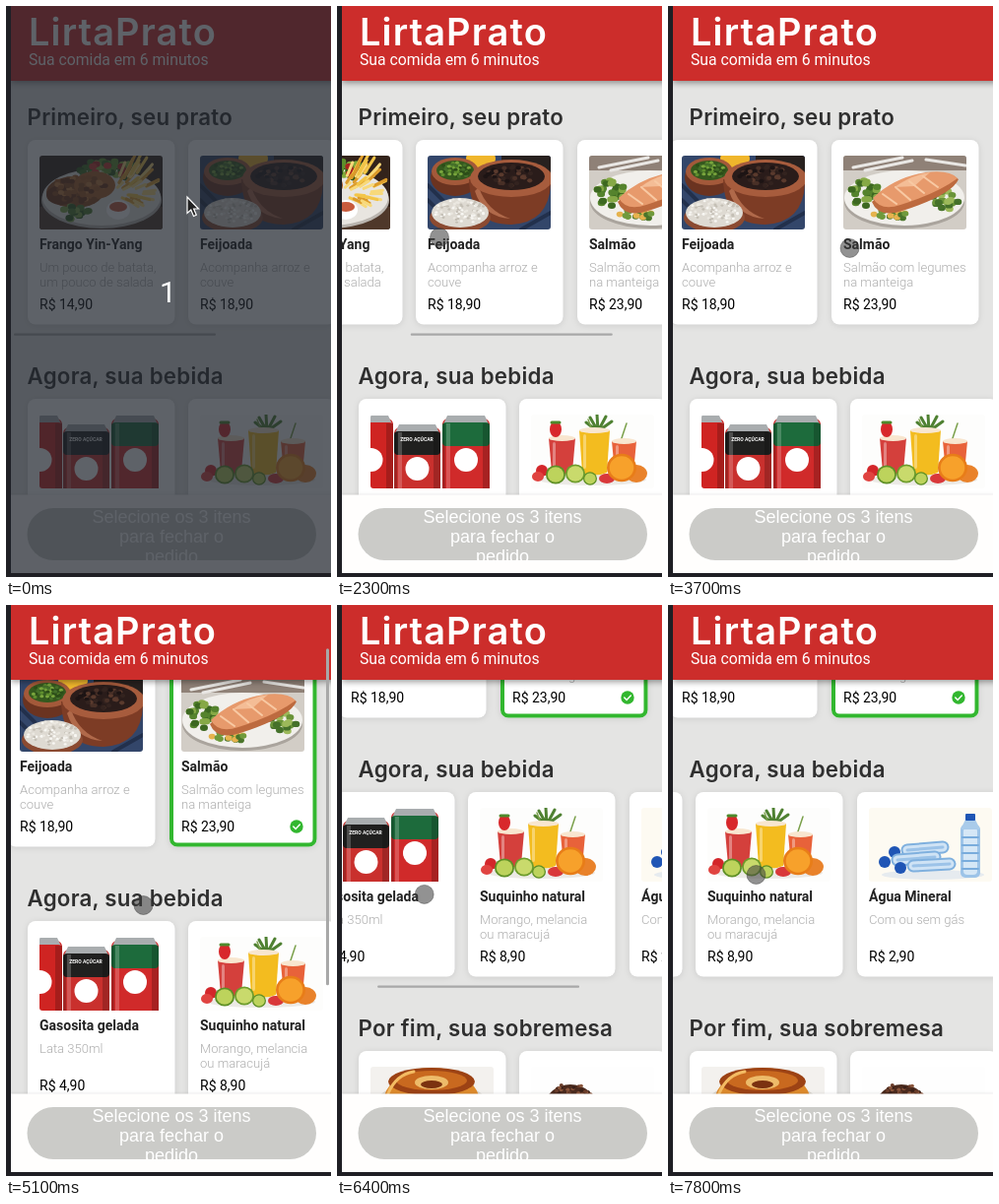
Recreate the animation shown at these times as an HTML page. Size 330 px wide and 580 px high, loop 8 s.

```html
<!DOCTYPE html>
<html lang="pt-BR">
<head>
<meta charset="utf-8">
<style>
html, body { margin: 0; width: 100%; height: 100%; overflow: hidden; background: #1f1f24; }
svg { display: block; }
text { font-family: Roboto, sans-serif; }
.brand { font: 600 38px Inter, sans-serif; letter-spacing: 1.1px; fill: #fff; }
.title { font: 600 22.3px Inter, sans-serif; letter-spacing: .25px; fill: #2f2f2f; }
.name { font-weight: 700; font-size: 14px; fill: #222; }
.desc { font-weight: 300; font-size: 13.05px; fill: #adadad; }
.price { font-size: 14px; }
.button { font: 18px "Liberation Sans", Arial, sans-serif; fill: #fff; text-anchor: middle; }
.card { fill: #fff; filter: drop-shadow(0 1px 3px rgba(0,0,0,.1)); }
.header { fill: #cc2d2b; filter: drop-shadow(0 2px 3px rgba(0,0,0,.4)); }
.footer { fill: #fffefd; filter: drop-shadow(0 -1px 1px rgba(0,0,0,.08)); }
</style>
</head>
<body>
<svg id="stage" width="330" height="580" viewBox="0 0 330 580"></svg>
<script>
const rect = (x, y, w, h, fill, rx = 0) =>
  `<rect x="${x}" y="${y}" width="${w}" height="${h}" rx="${rx}" fill="${fill}"/>`;
const oval = (x, y, rx, ry, fill) => `<ellipse cx="${x}" cy="${y}" rx="${rx}" ry="${ry}" fill="${fill}"/>`;
const path = (d, fill) => `<path d="${d}" fill="${fill}"/>`;
const line = (d, color, w) =>
  `<path d="${d}" fill="none" stroke="${color}" stroke-width="${w}" stroke-linecap="round"/>`;
const text = (x, y, cls, s, more = '') => `<text x="${x}" y="${y}" class="${cls}" ${more}>${s}</text>`;

let seed = 7;
const rnd = () => (seed = seed * 16807 % 2147483647) / 2147483647;
const spread = (n, draw) => Array.from({ length: n }, (_, i) => {
  const a = rnd() * 6.283, d = Math.sqrt(rnd());
  return draw(Math.cos(a) * d, Math.sin(a) * d, i);
}).join('');
// A heap of small pieces filling an ellipse
const heap = (n, x, y, rx, ry, size, colors) => spread(n, (u, v, i) =>
  oval((x + u * rx).toFixed(1), (y + v * ry).toFixed(1), size, size * .8, colors[i % colors.length]));

function chicken() {
  return rect(0, 0, 125, 75, '#33231b') + rect(0, 52, 125, 23, '#4f382a') +
    oval(63, 45, 61, 29, '#b9b4ae') + oval(63, 42, 60, 29, '#e8e5e0') +
    heap(55, 68, 15, 32, 10, 4, ['#5d8f2c', '#83ac3c', '#3f6d22', '#2f5519']) +
    heap(9, 74, 13, 26, 6, 4, ['#c8352a', '#a9241f']) +
    spread(42, (u, v, i) => {
      const x = 92 + u * 17, y = 32 + v * 17;
      return line(`M${x} ${y}l${8 + u * 4} ${v * 12 - 5}`, ['#f3c548', '#dc9b2a', '#f8d97a'][i % 3], 3);
    }) +
    oval(36, 37, 29, 16, '#8a4719') + oval(56, 30, 21, 14, '#a95c25') + oval(22, 40, 15, 10, '#6d3213') +
    heap(50, 40, 34, 28, 13, 3, ['#c47a38', '#6d3213', '#a0561f', '#8a4719']) +
    heap(16, 37, 58, 16, 7, 4, ['#4a7a2a', '#79a443', '#2f5a1d']) +
    oval(80, 55, 12, 10, '#fff') + oval(80, 52, 9, 5, '#c75a3c');
}

function beans() {
  return rect(0, 0, 125, 75, '#33466a') + rect(75, 0, 50, 30, '#28211f') +
    line('M0 45L30 75M0 30L45 75M95 75L125 58', '#22304c', 4) +
    oval(54, 3, 15, 10, '#f0b62c') +
    oval(28, 22, 25, 19, '#6b3320') + oval(28, 16, 24, 14, '#a3593a') + oval(28, 15, 19, 10, '#35591e') +
    heap(46, 28, 15, 16, 8, 2, ['#5f8f2e', '#2c4d18', '#79a53d', '#45702a']) +
    path('M42 24Q43 70 85 70Q127 68 125 20Z', '#7d3c25') + path('M48 36Q56 62 84 64Q60 56 52 32Z', '#b0694a') +
    oval(85, 23, 42, 19, '#a75c3d') + oval(85, 21, 34, 14, '#2a1c1a') +
    heap(44, 85, 21, 28, 10, 2.6, ['#493027', '#1d1414', '#5a3a2d', '#33231f']) +
    oval(33, 63, 31, 15, '#8b4a31') + oval(33, 58, 29, 15, '#dedad2') +
    heap(90, 33, 57, 26, 13, 1.5, ['#f8f7f3', '#c4bfb5', '#ebe8e1']);
}

function salmon() {
  return rect(0, 0, 125, 75, '#d2cdc6') + rect(0, 0, 125, 15, '#8f8177') +
    line('M10 12L60 2M22 15L70 5M84 4L124 10', '#e9e7e4', 3) +
    oval(62, 47, 61, 27, '#aaa49d') + oval(62, 43, 61, 28, '#f1efeb') +
    heap(30, 22, 38, 15, 13, 4, ['#55832d', '#86a946', '#3d6821']) +
    heap(22, 102, 45, 15, 10, 4, ['#6a9438', '#45712a', '#9cb95a']) +
    heap(20, 47, 60, 20, 5, 3.5, ['#6f9a3c', '#e6b34e', '#4a752a']) +
    path('M29 47Q46 30 78 22Q106 14 117 24Q110 40 60 56Q36 64 29 47Z', '#bd6a3f') +
    path('M30 43Q52 22 84 17Q108 14 116 23Q96 38 58 50Q38 57 30 43Z', '#e79a6c') +
    path('M52 32Q68 20 88 17L72 31Z', '#f4bd96') +
    line('M40 39l14 10M53 32l15 13M67 26l15 12M81 21l15 11', '#f8c9a3', 2);
}

function can(x, y, w, top, side) {
  const mid = x + w / 2;
  return rect(x, y + 3, w, 82, side, 6) + path(`M${x} ${y + 11}L${x + 5} ${y}H${x + w - 5}L${x + w} ${y + 11}Z`, '#a9adaf') +
    rect(x, y + 7, w, 24, top, 4) + rect(x + 4, y + 8, 4, 67, 'rgba(255,255,255,.2)') +
    rect(x, y + 8, 3, 67, 'rgba(0,0,0,.2)') + rect(x + w - 7, y + 8, 7, 67, 'rgba(0,0,0,.2)') +
    oval(mid, y + 45, 12, 12, '#fff');
}
function cans() {
  return rect(0, 0, 125, 75, '#fff') + can(-22, 1, 45, '#cf2422', '#cf2422') +
    can(73, 1, 48, '#1d6b3c', '#d02a2a') + can(24, 10, 47, '#20201f', '#c9302d') +
    text(47, 27, '', 'ZERO AÇÚCAR', 'font-size="5" font-weight="700" fill="#fff" text-anchor="middle"');
}

function glass(x, y, w, h, color) {
  return path(`M${x} ${y}H${x + w}L${x + w - 3} ${y + h}Q${x + w / 2} ${y + h + 5} ${x + 3} ${y + h}Z`, color) +
    oval(x + w / 2, y, w / 2, 3, '#f8e6cf') + rect(x + 4, y + 4, 3, h - 8, 'rgba(255,255,255,.35)', 2);
}
function slice(x, y, r, rim, flesh) {
  return oval(x, y, r, r * .95, rim) + oval(x, y, r * .82, r * .78, flesh);
}
function juice() {
  return rect(0, 0, 125, 75, '#fdfdfc') + oval(62, 66, 55, 6, '#eceae6') +
    line('M68 17L60 3M68 17L67 0M68 17L76 2M68 17L82 7M68 17L56 8', '#4f8132', 3) +
    line('M61 13l-3 -8M91 27l6 -18', '#7aa04a', 1.5) +
    glass(18, 24, 27, 34, '#d4403c') + glass(82, 27, 25, 32, '#e8623a') + glass(49, 16, 31, 43, '#f3bc1f') +
    oval(25, 15, 6, 8, '#d8282b') + line('M21 8h8', '#4e8a2c', 3) +
    oval(11, 57, 6, 6, '#d3262a') + oval(7, 63, 6, 5, '#e04340') +
    slice(25, 61, 10, '#5d8f25', '#bdd35c') + slice(45, 60, 10, '#6d9c2c', '#c9da6c') + slice(60, 65, 7, '#5d8f25', '#bdd35c') +
    oval(77, 65, 8, 5, '#d9383a') + oval(107, 60, 11, 9, '#e9822a') + slice(92, 54, 15, '#e87d18', '#f7a12b');
}

function lyingBottle(x, y, dx, dy) {
  const d = `M${x + 13} ${y - 2}l${dx} ${dy}`;
  return line(d, '#7fb0de', 13) + line(d, '#cfe3f5', 9) + line(d, '#9cc3e8', 3) + oval(x, y, 6, 6, '#1f55b5');
}
function water() {
  return rect(0, 0, 125, 75, '#fdfaf2') + oval(65, 68, 52, 5, '#e6ebef') +
    lyingBottle(26, 45, 36, -3) + lyingBottle(16, 55, 38, -3) + lyingBottle(32, 61, 37, -2) +
    rect(93, 17, 20, 54, '#9dc4e8', 5) + rect(96, 20, 14, 48, '#d5e7f6', 4) +
    path('M98 12h10l5 10H93Z', '#a9cbea') + rect(98, 6, 10, 7, '#1f55b5', 1) +
    line('M95 30h16M95 38h16M95 46h16M95 54h16M95 62h16', '#79acdc', 2);
}

function flan() {
  return rect(0, 0, 125, 75, '#f3f1ee') + oval(62, 44, 61, 30, '#d9d6d0') +
    path('M10 50Q12 2 62 1Q112 2 114 50Z', '#dd8a2c') + oval(62, 15, 44, 14, '#9c4214') +
    oval(62, 14, 36, 10, '#c9691f') + oval(62, 16, 17, 7, '#edbb6a') + oval(62, 18, 11, 4, '#7b3210') +
    line('M18 27Q26 8 44 5', '#f3bb63', 3);
}

function truffle() {
  return rect(0, 0, 125, 75, '#fefefe') + oval(40, 40, 26, 22, '#4b2a1d') +
    heap(90, 40, 38, 26, 21, 2, ['#6b3d2a', '#3a2018', '#8a553b']);
}

const menu = [
  ['Primeiro, seu prato', [
    [chicken, 'Frango Yin-Yang', ['Um pouco de batata,', 'um pouco de salada'], '14,90'],
    [beans, 'Feijoada', ['Acompanha arroz e', 'couve'], '18,90'],
    [salmon, 'Salmão', ['Salmão com legumes', 'na manteiga'], '23,90']]],
  ['Agora, sua bebida', [
    [cans, 'Gasosita gelada', ['Lata 350ml'], '4,90'],
    [juice, 'Suquinho natural', ['Morango, melancia', 'ou maracujá'], '8,90'],
    [water, 'Água Mineral', ['Com ou sem gás'], '2,90']]],
  ['Por fim, sua sobremesa', [
    [flan, 'Pudim', ['Com calda'], '6,90'],
    [truffle, 'Brigadeiro', ['Com granulado'], '3,90']]]
];

const card = ([photo, name, desc, price], i) => `<g transform="translate(${Math.round(21.6 + i * 163.5)} 136)">
  <rect class="card" width="149.5" height="187.5" rx="8"/>
  <g transform="translate(12 16)" clip-path="url(#photo)">${photo()}</g>` +
  text(12, 111, 'name', name) + desc.map((s, k) => text(12, 134 + k * 15, 'desc', s)).join('') +
  text(12, 172, 'price', 'R$ ' + price) + '</g>';

const section = ([title, items], i) => `<g transform="translate(0 ${i * 263})">` + text(21.5, 121, 'title', title) +
  `<g id="row${i}">${items.map(card).join('')}</g>
  <rect id="bar${i}" x="8" y="332.5" width="205" height="2.3" rx="1" fill="#a8a8a8"/></g>`;

const $ = id => document.getElementById(id);
$('stage').innerHTML = `<clipPath id="photo"><rect width="125" height="75" rx="3"/></clipPath>` +
  rect(0, 0, 330, 580, '#e4e4e3') +
  `<g id="page">${menu.map(section).join('')}
    <g id="picked" transform="translate(166 136)">
      <rect x="2" y="2" width="145.5" height="183.5" rx="6" fill="none" stroke="#32b72f" stroke-width="4"/>
      ${oval(129, 167, 6.7, 6.7, '#32b72f') + line('M125.8 167l2.3 2.4l4.2 -4.4', '#fff', 1.5)}
    </g></g>` +
  '<rect class="header" x="5" y="-10" width="335" height="86"/>' +
  text(23, 40, 'brand', 'LirtaPrato') +
  text(23, 60, '', 'Sua comida em 6 minutos', 'font-size="15.75" fill="#fff"') +
  '<rect class="footer" x="5" y="496.5" width="335" height="80"/>' +
  rect(21.5, 510, 293.5, 53, '#cbcbc8', 26.5) +
  '<clipPath id="pill"><rect x="21" y="510" width="294" height="53"/></clipPath><g clip-path="url(#pill)">' +
  ['Selecione os 3 itens', 'para fechar o', 'pedido'].map((s, i) => text(168, 525 + i * 20, 'button', s)).join('') + '</g>' +
  '<rect id="thumb" x="325" width="3" height="342" rx="1.5" fill="#a8a8a8"/>' +
  rect(0, 0, 5, 580, '#1f1f24') + rect(0, 576, 330, 4, '#1f1f24') +
  `<g id="shade"><rect id="dim" x="4.5" width="326" height="576" fill="#20262e"/>
    ${text(164.5, 301, '', '1', 'font-size="30" fill="#fff" text-anchor="middle" id="count"')}</g>
  <path id="arrow" d="M0 0V16.5L3.8 13L6.5 19.5L9.3 18.3L6.6 12H11.5Z" fill="#222" stroke="#fff" stroke-width="1.2"/>
  <circle id="touch" r="9.5" fill="rgba(60,60,60,.56)" stroke="rgba(50,50,50,.4)"/>`;

// Linear interpolation through [time, value] points
function track(t, keys, col = 1) {
  let i = keys.findIndex(k => k[0] > t);
  if (i < 0) return keys[keys.length - 1][col];
  if (!i) return keys[0][col];
  const a = keys[i - 1], b = keys[i];
  return a[col] + (b[col] - a[col]) * (t - a[0]) / (b[0] - a[0]);
}

const touchPath = [[1200, 182, 208], [1300, 182, 210], [2000, 77, 226], [2200, 96, 234], [2300, 104, 235],
  [2600, 20, 237], [2800, 20, 237], [3400, 186, 248], [3500, 186, 248], [3700, 184.5, 246], [4300, 184.5, 246],
  [4500, 139.5, 305], [5900, 139.5, 305], [6800, 48, 285], [7200, -13, 276], [7500, -13, 276], [7800, 89.5, 274]];
const arrowPath = [[400, 184, 194], [600, 181, 196]];
const dishes = [[1300, 0], [2000, 105], [2300, 105], [2600, 183]];
const drinks = [[5900, 0], [6800, 94], [7200, 157]];
const scroll = [[5000, 0], [5100, 78], [5200, 104], [5400, 104], [5500, 150], [5600, 190], [5700, 208], [5800, 209]];

const move = (id, x, y) => $(id).setAttribute('transform', `translate(${x} ${y})`);
const show = (id, o) => $(id).setAttribute('opacity', o);

function draw(now) {
  const t = Math.floor(now % 8000 / 100) * 100; // ten pictures a second
  [dishes, drinks].forEach((keys, i) => {
    const x = Math.round(track(t, keys));
    move('row' + i, -x, 0);
    move('bar' + i, x * .636, 0);
  });
  show('bar0', track(t, [[2800, 1], [3400, 0]]));
  show('bar1', track(t, [[7500, 1], [7800, 0]]));
  const y = track(t, scroll);
  move('page', 0, -y);
  move('thumb', 0, y * .593 - 2);
  show('thumb', t < 5100 ? 0 : track(t, [[5900, 1], [6300, 0]]));
  show('picked', t < 4200 ? 0 : 1);
  const shade = track(t, [[0, 1], [300, 0]]);
  show('dim', shade * .72);
  show('count', shade);
  move('arrow', track(t, arrowPath), track(t, arrowPath, 2));
  show('arrow', t < 700 ? 1 : 0);
  move('touch', track(t, touchPath), track(t, touchPath, 2));
  show('touch', t < 700 ? 0 : 1);
}

const start = performance.now();
function loop() {
  draw(performance.now() - start);
  requestAnimationFrame(loop);
}
loop();
</script>
</body>
</html>
```
